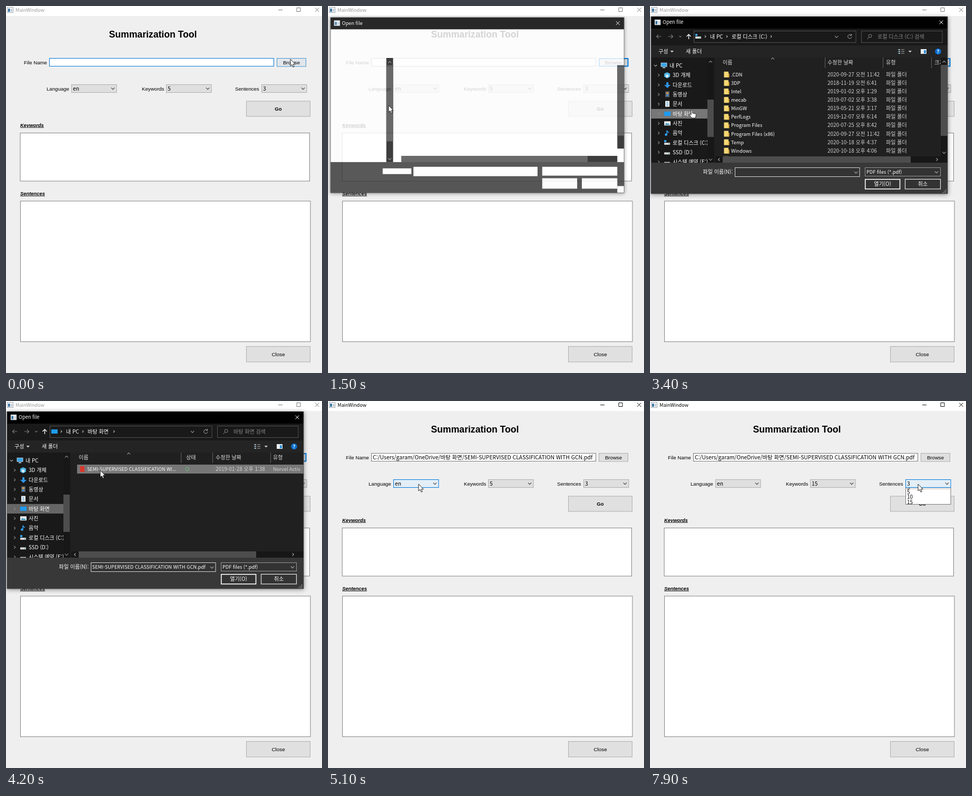
Write an HTML page that moves like this. It is 600 px wide and 698 px high and loops after 8 s.

```html
<!DOCTYPE html>
<html lang="ko">
<head>
<meta charset="utf-8">
<title>Summarization Tool</title>
<style>
html, body { margin: 0; width: 100%; height: 100%; overflow: hidden; background: #f0eff0; }
svg { display: block; width: 600px; height: 698px; }
text { white-space: pre; }
.ui { font-family: "Liberation Sans", Arial, sans-serif; }
.ko { font-family: "Noto Sans CJK KR", "Noto Sans CJK", "Noto Sans", sans-serif; }
</style>
</head>
<body>
<svg id="stage" viewBox="0 0 600 698"></svg>
<script>
const LOOP = 8000, STEP = 100;
const stage = document.getElementById('stage');
const BLUE = '#0078d7';
const PDF = 'SEMI-SUPERVISED CLASSIFICATION WITH GCN.pdf';

// Cursor path: time, x, y
const PATH = [
  [0, 540, 101], [400, 540, 101], [1300, 115, 189], [1500, 115, 189],
  [1800, 70, 171], [2200, 70, 171], [2500, 64, 152], [2900, 72, 256],
  [3000, 72, 258], [3200, 78, 197], [3400, 78, 197], [3900, 179, 132],
  [4500, 179, 132], [5100, 172, 158], [5300, 172, 158], [6000, 351, 160],
  [6300, 351, 160], [6700, 318, 188], [7000, 318, 188], [7700, 509, 158], [8000, 509, 158]
];

const NAV = ['내 PC', '3D 개체', '다운로드', '동영상', '문서', '바탕 화면', '사진', '음악',
  '로컬 디스크 (C:)', 'SSD (D:)', '시스템 예약 (E:)'];
const FOLDERS = [
  ['.CDN', '2020-09-27 오전 11:42'], ['3DP', '2018-11-19 오전 6:41'],
  ['Intel', '2019-01-02 오후 1:29'], ['mecab', '2019-07-02 오후 3:38'],
  ['MinGW', '2019-05-21 오후 3:17'], ['PerfLogs', '2019-12-07 오후 6:14'],
  ['Program Files', '2020-07-25 오후 8:42'], ['Program Files (x86)', '2020-09-27 오전 11:42'],
  ['Temp', '2020-10-18 오후 4:37'], ['Windows', '2020-10-18 오후 4:06']
];

const box = (x, y, x2, y2, fill, line, w = 1) =>
  `<rect x="${x}" y="${y}" width="${x2 - x}" height="${y2 - y}" fill="${fill}"` +
  (line ? ` stroke="${line}" stroke-width="${w}"` : '') + '/>';
const label = (x, y, s, size, fill, cls, more = '') =>
  `<text x="${x}" y="${y}" class="${cls}" font-size="${size}" fill="${fill}" ${more}>${s}</text>`;
const ui = (x, y, s, size = 9.65, more = '') => label(x, y, s, size, '#000', 'ui', more);
const ko = (x, y, s, size = 10, fill = '#fff', more = '') => label(x, y, s, size, fill, 'ko', more);
const line = (d, color, w = 1) => `<path d="${d}" fill="none" stroke="${color}" stroke-width="${w}"/>`;
const shape = (d, fill) => `<path d="${d}" fill="${fill}"/>`;
const MID = 'text-anchor="middle"';

// Chevrons centred on x, y
const down = (x, y, c, r = 3.2) => line(`M${x - r} ${y - r / 2}l${r} ${r} ${r} ${-r}`, c, 1.1);
const up = (x, y, c, r = 3) => line(`M${x - r} ${y + r / 2}l${r} ${-r} ${r} ${r}`, c, 1.1);
const right = (x, y, c, r = 2.6) => line(`M${x - r / 2} ${y - r}l${r} ${r} ${-r} ${r}`, c, 1.1);
const left = (x, y, c, r = 2.6) => line(`M${x + r / 2} ${y - r}l${-r} ${r} ${r} ${r}`, c, 1.1);

function cursorAt(t) {
  let i = 0;
  while (i < PATH.length - 2 && PATH[i + 1][0] <= t) i++;
  const [a, x, y] = PATH[i], [b, x2, y2] = PATH[i + 1];
  const p = Math.min(1, (t - a) / (b - a)), e = p * p * (3 - 2 * p);
  return { x: x + (x2 - x) * e, y: y + (y2 - y) * e };
}

function pointer(c, hand) {
  const d = hand
    ? 'M0 1.2Q1.3-.6 2.4 1.2V6.6L8.2 7.8Q9.6 8.4 9.4 10.4L8.4 16H1.4L-3 10.4Q-3.4 8.4-1.6 8.8L0 10.2Z'
    : 'M0 0V13L3 10.4 5 15.2 7.2 14.3 5.2 9.7H9.2Z';
  return `<path transform="translate(${c.x} ${c.y})" d="${d}" fill="#fff" stroke="#111" stroke-width=".9"/>`;
}

const appIcon = (x, y) =>
  box(x, y, x + 11, y + 10, '#f4f6f8', '#8a949c', .8) + box(x + 1.5, y + 2.5, x + 5, y + 8.5, '#2f6f9f') +
  box(x + 6.5, y + 3, x + 9.5, y + 8, '#c4ccd2');

function combo(x, s, look) {
  const [fill, edge] = { hot: ['#e3eef7', BLUE], focus: ['#dce2e7', '#4c97cc'] }[look] || ['#e0dfe0', '#adadad'];
  return box(x + .5, 149.5, x + 86, 164.5, fill, edge) +
    ko(x + 3, 160.6, s, 10.3, '#000') + down(x + 79, 157, '#444');
}

function dropdown(x, items, pick, k) {
  const h = 41 * k, dy = h - 41;
  const rows = items.map((s, i) => {
    const y = 168 + i * 9.4 + dy;
    return (i === pick ? box(x + 1, y, x + 85, y + 9.4, '#e6e2df') : '') + ko(x + 3, y + 8.6, s, 9.8, '#000');
  }).join('');
  return `<clipPath id="drop"><rect x="${x}" y="165" width="87" height="${h + 1}"/></clipPath>` +
    `<g clip-path="url(#drop)">${box(x + .5, 164.5, x + 86, 165 + h - .5, '#fff', '#777')}${rows}</g>`;
}

function mainWindow(t, c) {
  const active = t >= 100 && t < 500 || t >= 4300;
  const ink = active ? '#000' : '#999', key = active ? '#111' : '#777';
  const overBrowse = c.x > 514 && c.x < 570 && c.y > 99 && c.y < 115;
  const chosen = t >= 300 && t < 4300;
  const browse = chosen ? [overBrowse ? '#e0e8ef' : '#e1e0e1', BLUE, 2]
    : overBrowse ? ['#e0e6ec', '#4c97cc', 1] : ['#e1e0e1', '#adadad', 1];
  const overLang = t >= 4900 && c.x > 124 && c.x < 211;
  const langLook = overLang ? 'hot' : t >= 5200 && t < 6200 ? 'focus' : '';
  const keyLook = t >= 5700 && c.x > 304 && c.x < 390 ? 'hot' : '';
  const sentLook = t >= 7200 && c.x > 485 ? 'hot' : '';
  const head = 'font-weight="bold" font-style="italic" text-decoration="underline"';
  return box(0, 0, 600, 698, '#f0eff0') + box(0, 0, 600, 19, '#fff') + appIcon(2.5, 2.5) +
    ko(18, 10.8, 'MainWindow', 9.1, ink) +
    line('M517 7.5h8', key) + line('M552 3.5h7v7h-7z', key) + line('M587 3.5l7.5 7.5m0-7.5l-7.5 7.5', key) +
    ui(279, 60.3, 'Summarization Tool', 17.6, 'font-weight="bold" ' + MID) +
    ui(34, 110.8, 'File Name') +
    box(82.5, 99.5, 508.5, 114.5, '#fff', t < 300 ? BLUE : '#7a7a7a') +
    (t >= 4600 ? ko(85, 110.6, 'C:/Users/garam/OneDrive/바탕 화면/' + PDF, 10.4, '#000') : '') +
    (browse[2] > 1 ? box(515, 100, 569.5, 114.5, ...browse) : box(514.5, 99.5, 569.5, 115, ...browse)) +
    ui(542, 110.9, 'Browse', 9.65, MID) +
    ui(77, 160.8, 'Language') + combo(124, 'en', langLook) +
    ui(258, 160.8, 'Keywords') + combo(304, t < 6800 ? '5' : '15', keyLook) +
    ui(435, 160.8, 'Sentences') + combo(485, '3', sentLook) +
    box(456.5, 181, 577.5, 210, '#e1e0e1', '#adadad') + ui(517, 199.2, 'Go', 9.65, 'font-weight="bold" ' + MID) +
    ui(27, 229.6, 'Keywords', 9.4, head) + box(27, 241.5, 576.5, 333, '#fff', '#828286') +
    ui(27, 359.8, 'Sentences', 9.4, head) + box(27.5, 371, 578, 638.5, '#fff', '#828286') +
    box(456.5, 647.5, 577.5, 677, '#e1e0e1', '#adadad') + ui(517, 666, 'Close', 9.9, MID);
}

function navIcon(i, x, y) {
  const drive = box(x, y, x + 11, y + 4, '#d5d8da') + box(x + 8, y + 1.5, x + 10, y + 2.7, '#3c9a4a');
  switch (i) {
    case 0: return box(x, y - 5, x + 11, y + 2, '#35a4e8', '#cfe6f5', .8) + box(x + 3, y + 3.5, x + 8, y + 5, '#cfe6f5');
    case 1: return shape(`M${x} ${y - 3}l5.500-2.500 5.500 2.500v6l-5.500 3-5.500-3z`, '#4db4e4') + box(x + 3, y - 1, x + 8, y + 4, '#d8eef8');
    case 2: return shape(`M${x + 4} ${y - 5}h4v5h4l-6 6-6-6h4z`, '#2f95e8');
    case 3: return box(x + 2, y - 6, x + 10, y + 5, '#59606a') + box(x + 4, y - 4, x + 8, y - 1, '#d9a14a') + box(x + 4, y, x + 8, y + 3, '#4b8fd0');
    case 4: return box(x + 2, y - 6, x + 10, y + 5, '#f2f5f7') + line(`M${x + 4} ${y - 3}h4m-4 2.500h4m-4 2.500h4`, '#3d8fc9');
    case 5: return box(x, y - 4, x + 12, y + 4, '#1e9bf0');
    case 6: return box(x, y - 4, x + 12, y + 4, '#eef3f6') + shape(`M${x + 1} ${y + 3}l3-4 3 2 2-1 2 3z`, '#3f8fb8');
    case 7: return line(`M${x + 5} ${y + 3}v-8q1 3 4 4`, '#2f9df0', 1.6) + `<circle cx="${x + 3.5}" cy="${y + 3}" r="2.400" fill="#2f9df0"/>`;
    case 8: return box(x, y - 5, x + 4, y - 1, '#35a4e8') + drive;
    default: return drive;
  }
}

function sidebar(c, desk, chevrons) {
  const hover = c.x < 109 && c.y > 98 ? Math.round((c.y - 113.2 + 6) / 18.35) : -1;
  const chosen = desk ? 5 : chevrons && hover === 5 ? -1 : 8;
  let s = box(2, 98, 122, 298, '#191919');
  NAV.forEach((name, i) => {
    const y = 113.2 + i * 18.35, dx = i ? 6 : 0;
    const fill = i === chosen && i === hover ? '#777' : i === hover ? '#4d4d4d' : i === chosen ? (desk ? '#666' : '#333') : '';
    if (fill) s += box(2, y - 9.1, 109, y + 9.1, fill);
    if (chevrons) s += i ? right(16.5, y, '#8a8a8a') : down(10.5, y, '#aaa', 2.8);
    s += navIcon(i, 21 + dx, y) + ko(37 + dx, y + 3.6, name);
  });
  return s + box(109, 98, 121, 298, '#171717') + box(109, 178, 121, 249, '#4d4d4d') +
    up(115, 106, '#888') + down(115, 292, '#888');
}

function hbar(end, arrows) {
  return box(124, 286, 565, 298, '#171717') + box(138, 286, end, 298, '#4d4d4d') +
    (arrows ? left(131, 292, '#aaa') + right(545, 292, '#aaa') : '');
}

function driveList() {
  let s = box(122, 98, 565, 298, '#202020') + up(233, 100, '#999', 2.8) + line('M332.5 98v20M442.500 98v20M534.500 98v20', '#636363') +
    ko(138, 111.3, '이름', 10, '#dedede') + ko(337, 111.3, '수정한 날짜', 10, '#dedede') +
    ko(448, 111.3, '유형', 10, '#dedede') + ko(540, 111.3, '크기', 10, '#dedede');
  for (let i = 0; i <= FOLDERS.length; i++) {
    const y = 130.3 + i * 16.1;
    s += box(140.5, y - 5.5, 149, y + 5.5, '#f7d774') + box(148, y - 2, 150.5, y + 5.5, '#e3b548');
    if (i === FOLDERS.length) break;
    s += ko(154, y + 3.5, FOLDERS[i][0], 9.2) + ko(337, y + 3.5, FOLDERS[i][1], 9.9, '#d4d4d4') +
      ko(448, y + 3.5, '파일 폴더', 10, '#d4d4d4');
  }
  return s + box(552, 98, 565, 298, '#171717') + box(552, 112, 565, 247, '#4d4d4d') +
    up(558.5, 106, '#999') + down(558.5, 279, '#999') + hbar(495, true);
}

function deskList(picked) {
  return box(122, 98, 565, 298, '#202020') + line('M332.5 98v20M392.500 98v20M502.500 98v20', '#636363') +
    up(233, 100, '#999', 2.8) +
    ko(138, 111.3, '이름', 10, '#dedede') + ko(342, 111.3, '상태', 10, '#dedede') +
    ko(398, 111.3, '수정한 날짜', 10, '#dedede') + ko(507, 111.3, '유형', 10, '#dedede') +
    box(135, 121, 565, 138, picked ? '#777' : '#202020') +
    box(140.5, 124, 149, 135, '#d8382c') + ko(154, 133.2, 'SEMI-SUPERVISED CLASSIFICATION WI...', 9) +
    `<circle cx="344" cy="129.500" r="3.200" fill="none" stroke="#6cc07a"/>` +
    ko(398, 133.2, '2019-01-28 오후 1:38', 9.9, '#d4d4d4') + ko(507, 133.2, 'Norvel Activ', 9.2, '#d4d4d4') +
    hbar(475, true);
}

function addressBar(desk) {
  const place = desk ? '바탕 화면' : '로컬 디스크 (C:)';
  return box(2, 43, 565, 75, '#191919') +
    line('M21.5 58h-9m3.500-3.500l-3.500 3.500 3.500 3.500M34.500 58h9m-3.500-3.500l3.500 3.500-3.500 3.500', '#777', 1.2) +
    down(57.5, 58, '#777', 2.4) + line('M73.5 63v-9m-4 4l4-4 4 4', '#fff', 1.3) +
    box(83.5, 47.5, 391, 69.5, '#191919', '#535353') + navIcon(desk ? 5 : 8, 86, 58) +
    right(105, 58, '#bbb', 2.2) + ko(114, 61.6, '내 PC') + right(146, 58, '#bbb', 2.2) + ko(155, 61.6, place) +
    right(desk ? 205 : 230, 58, '#bbb', 2.2) + down(354, 58.5, '#999') +
    line('M382 55.5a3.700 3.700 0 1 0 1 3M382.500 53v3h-3', '#aaa') +
    box(401.5, 47.5, 555, 69.5, '#191919', '#535353') +
    line('M415.5 59.500l-3 3.500', '#888') + '<circle cx="418" cy="57" r="3" fill="none" stroke="#888"/>' +
    ko(432, 61.6, place + ' 검색', 10, '#8a8a8a');
}

function toolbar(full) {
  return box(2, 75, 565, 98, '#242424') +
    box(514, 82, 525, 91, '#f0f3f5') + box(520, 84, 524, 90, '#2d8fd8') +
    '<circle cx="547" cy="86.500" r="5.800" fill="#0a6fd0"/>' + ko(547, 90, '?', 9.5, '#fff', 'font-weight="bold" ' + MID) +
    (full ? ko(16, 90, '구성') + shape('M38.500 85h6.500l-3.200 3.500z', '#ccc') + ko(68, 90, '새 폴더') +
      line('M471.5 83h3.500m-3.500 3.500h3.500m-3.500 3.500h3.500', '#9db4c4', 2) +
      line('M477 83h6m-6 3.500h6m-6 3.500h6', '#aaa') + shape('M490.500 85h6.500l-3.200 3.500z', '#ccc') : '');
}

function footer(full, name) {
  const base = box(2, 298, 565, 357, '#383838');
  if (!full) return base + box(102, 310, 157, 321, '#fff') + box(161, 307, 399, 325, '#fff') +
    box(408, 307, 552, 324, '#fff') + box(408, 329, 475, 349, '#fff') + box(484, 329, 552, 349, '#fff') +
    box(552, 344, 565, 357, '#fff');
  let grip = '';
  for (let i = 0; i < 3; i++)
    for (let j = 0; j <= i; j++) grip += box(561 - j * 2.6, 349 + i * 2.6, 562.3 - j * 2.6, 350.3 + i * 2.6, '#bbb');
  return base + ko(157, 319.2, '파일 이름(N):', 10, '#fff', 'text-anchor="end"') +
    box(161.5, 307.5, 398, 324.5, '#333', '#d8d8d8') + ko(163.5, 319.4, name, 9.2) + down(391, 316.5, '#aaa') +
    box(408.5, 307.5, 551.5, 323.5, '#333', '#999') + ko(411, 319.2, 'PDF files (*.pdf)', 9.2) + down(544, 316, '#aaa') +
    box(408.7, 329.7, 474.5, 348, '#333', '#fff', 1.6) + ko(441.5, 342.3, '열기(O)', 10, '#fff', MID) +
    box(484.5, 329.5, 551.5, 348, '#333', '#e8e8e8', 1.2) + ko(518, 342.3, '취소', 10, '#fff', MID) + grip;
}

// Half-painted window contents while it opens
const blank = () => box(2, 43, 565, 298, '#fff') +
  box(109, 98, 122, 298, '#171717') + box(109, 112, 122, 258, '#4d4d4d') + up(115.5, 106, '#888') + down(115.5, 292, '#888') +
  box(138, 286, 552, 298, '#171717') + box(138, 286, 495, 298, '#4d4d4d') +
  box(552, 112, 565, 272, '#171717') + box(552, 112, 565, 247, '#4d4d4d');

function dialog(t, c) {
  if (t < 1400 || t >= 4500) return '';
  const [alpha, scale] = { 1400: [.4, .975], 1500: [.83, .99], 1600: [.97, .998], 4300: [.5, .985], 4400: [.11, .957] }[t] || [1, 1];
  const full = t >= 2000, desk = t >= 3500, picked = t >= 4000;
  const body = t < 1700 ? blank()
    : sidebar(c, t >= 3400, full) + (desk ? deskList(picked) : driveList()) +
      toolbar(full) + (full ? addressBar(desk) : box(2, 43, 565, 75, '#fff'));
  return `<g opacity="${alpha}" transform="translate(283.500 188.500) scale(${scale}) translate(-283.500 -188.500)"` +
    ' style="filter:drop-shadow(0 1px 4px rgba(0,0,0,.45))">' +
    box(2, 20, 565, 43, '#000') + appIcon(9, 26) + ko(24, 34.4, 'Open file', 9.3) +
    line('M549.5 27.500l7 7m0-7l-7 7', '#fff') + body + footer(full, picked ? PDF : '') +
    line('M2 20V357H565V20', '#4a4a4a', .8) + '</g>';
}

function draw(t) {
  const c = cursorAt(t);
  let s = mainWindow(t, c) + dialog(t, c);
  if (t >= 6200 && t < 6800) {
    const row = Math.max(0, Math.min(3, Math.floor((c.y - 168) / 9.4)));
    s += dropdown(304, ['5', '10', '15', '20'], row, t < 6300 ? .78 : 1);
  }
  if (t >= 7900) s += dropdown(485, ['3', '5', '10', '15'], 0, .78);
  stage.innerHTML = s + pointer(c, t >= 1700 && t < 3600);
}

const start = performance.now();
let last = -1;
function tick() {
  const t = Math.floor(((performance.now() - start) % LOOP + 1) / STEP) * STEP % LOOP;
  if (t !== last) draw(last = t);
  requestAnimationFrame(tick);
}
tick();
</script>
</body>
</html>
```
